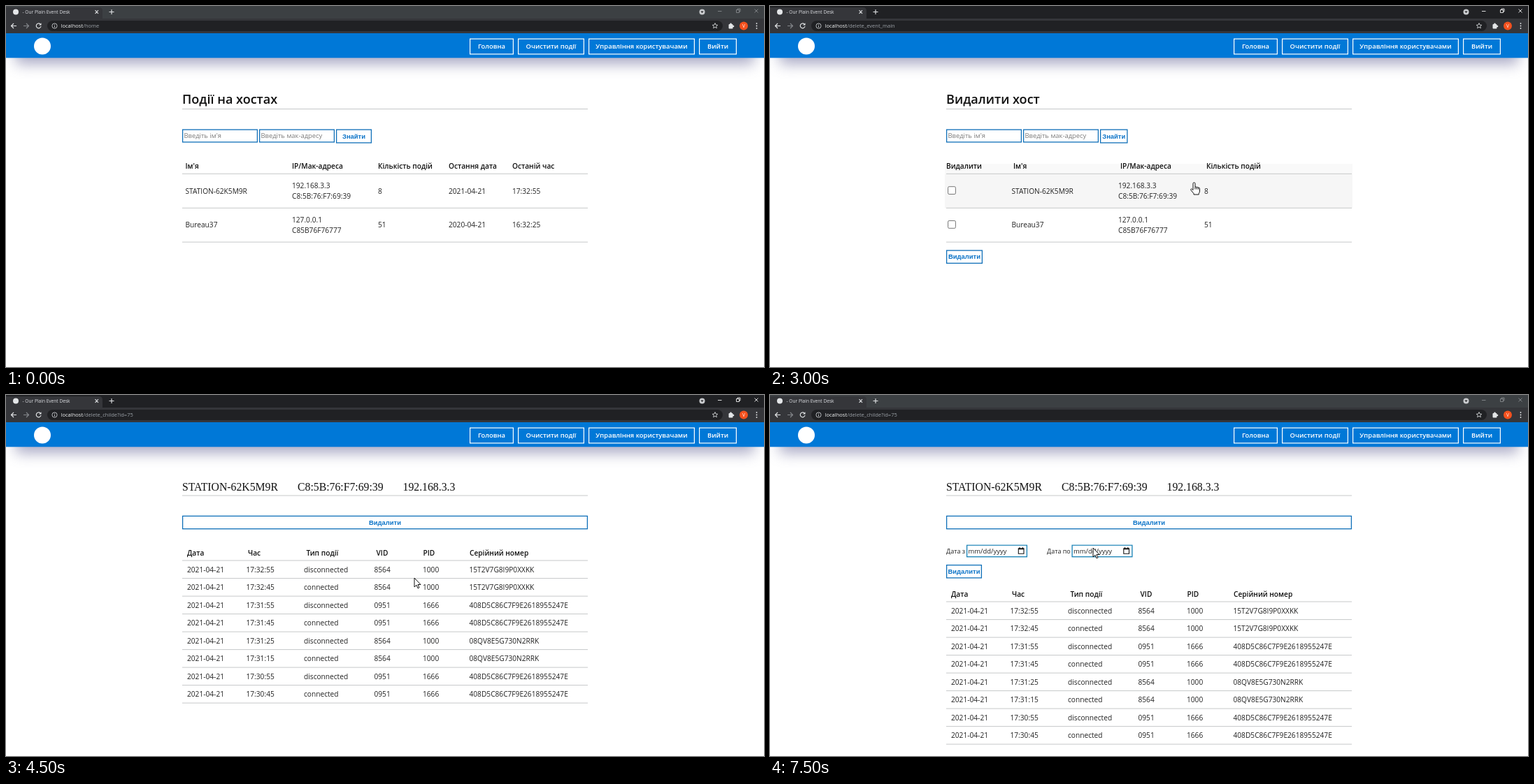
Write an HTML page that moves like this. It is 1084 px wide and 517 px high and loops after 8000 ms.

```html
<!DOCTYPE html>
<html lang="uk">
<head>
<meta charset="utf-8">
<style>
  html, body { margin: 0; width: 100%; height: 100%; overflow: hidden; background: #fff; }
  #stage { display: block; width: 1084px; height: 517px; }
  text { font-family: "Open Sans", sans-serif; white-space: pre; }
  .arial text, text.arial { font-family: "Liberation Sans", Arial, sans-serif; }
  text.serif { font-family: "Liberation Serif", serif; }
  .bold { font-weight: 700; }
  .semi { font-weight: 600; }
  .mid { text-anchor: middle; }
</style>
</head>
<body>
<svg id="stage" viewBox="0 0 1084 517"></svg>
<script>
const LOOP = 8000, STEP = 250;
const BODY = 10.16, CONTROL = 9.41, BLUE = '#0f6fb8', LINK = '#0c74c8';
const stage = document.getElementById('stage');

// y is the middle of the capital letters
const text = (x, y, str, size = BODY, cls = '', fill = '#222') =>
  `<text x="${x}" y="${y + size * .36}" font-size="${size}" class="${cls}" fill="${fill}">${str}</text>`;
const box = (x, y, w, h, fill, extra = '') =>
  `<rect x="${x}" y="${y}" width="${w}" height="${h}" fill="${fill}" ${extra}/>`;
const path = (d, stroke, width = 1, fill = 'none') =>
  `<path d="${d}" stroke="${stroke}" stroke-width="${width}" fill="${fill}"/>`;
const dot = (x, y, r, fill, extra = '') => `<circle cx="${x}" cy="${y}" r="${r}" fill="${fill}" ${extra}/>`;
const frame = (x1, y1, x2, y2, color, width = 1.3, radius = 0) =>
  box(x1 + .6, y1 + .6, x2 - x1 - 1.2, y2 - y1 - 1.2, 'none',
    `stroke="${color}" stroke-width="${width}" rx="${radius}"`);
const rule = y => path(`M252 ${y}H832`, '#c6c8c9', 1);
const button = (x1, y1, x2, y2, label, color = LINK, radius = 0) =>
  frame(x1, y1, x2, y2, color === LINK ? BLUE : color, 1.3, radius) +
  text((x1 + x2) / 2, (y1 + y2) / 2 - .2, label, CONTROL, 'arial bold mid', color);
const cells = (xs, y, values, cls = '', fill = '#222') =>
  values.map((v, i) => text(xs[i], y, v, BODY, cls, fill)).join('');

const HOSTS = [
  { name: 'STATION-62K5M9R', ip: '192.168.3.3', mac: 'C8:5B:76:F7:69:39', count: 8, seen: ['2021-04-21', '17:32:55'] },
  { name: 'Bureau37', ip: '127.0.0.1', mac: 'C85B76F76777', count: 51, seen: ['2020-04-21', '16:32:25'] }
];
const DEVICES = [
  ['8564', '1000', '15T2V7G8I9P0XXKK'],
  ['0951', '1666', '408D5C86C7F9E2618955247E'],
  ['8564', '1000', '08QV8E5G730N2RRK'],
  ['0951', '1666', '408D5C86C7F9E2618955247E']
];
const EVENTS = ['32:55', '32:45', '31:55', '31:45', '31:25', '31:15', '30:55', '30:45'].map((time, i) =>
  ['2021-04-21', '17:' + time, i % 2 ? 'connected' : 'disconnected', ...DEVICES[i >> 1]]);

// Pointer way points: time, x, y
const POINTER = [
  [250, 701, 380], [500, 730, 230], [750, 757, 120], [1000, 774, 62], [1250, 777, 56],
  [2250, 777, 56], [2500, 755, 120], [2750, 655, 228], [3000, 606.5, 253], [3750, 584.5, 267.5],
  [4500, 584, 262], [4750, 572, 205], [5000, 565.5, 182], [5500, 565.5, 182], [5750, 564, 185],
  [6250, 563, 186], [6750, 520, 204], [7250, 462, 219], [8000, 462, 219]
];

function pointerAt(t) {
  const i = POINTER.findIndex(p => p[0] > t);
  const [t0, x0, y0] = POINTER[i - 1], [t1, x1, y1] = POINTER[i];
  const k = (t - t0) / (t1 - t0);
  return [x0 + (x1 - x0) * k, y0 + (y1 - y0) * k];
}

function pointer(t) {
  if (t < 250) return '';
  const [x, y] = pointerAt(t);
  const hand = t >= 1000 && t < 2500 || t >= 3000 && t < 4500 || t >= 5000 && t < 6500;
  const shape = hand
    ? 'M-1.5 10V1.3a1.5 1.5 0 0 1 3 0V6.3q1.3-.8 2.4.3q1.4-.7 2.3.5q1.8-.3 1.8 1.6V12q0 2-1.3 3.5V17H-.5V15.6L-4.6 10.6q-.6-1.2.4-1.6q1-.3 2.7 1.6z' +
      'M1.5 6.3V9.5M3.9 6.6V9.5M6.2 7.1V9.7'
    : 'M0 0V13L3 10.2L5 14.8L7 13.9L5 9.5H9z';
  return `<g transform="translate(${x} ${y})">${path(shape, '#111', 1, '#fff')}</g>`;
}

function browser(t, url, focused, loading) {
  const glyph = focused ? '#f1f1f1' : '#85888c', icon = '#e4e6e8';
  const star = Array.from({ length: 10 }, (_, i) => {
    const a = i * Math.PI / 5, r = i % 2 ? 1.8 : 4;
    return `${(1014 + r * Math.sin(a)).toFixed(1)} ${(28.5 - r * Math.cos(a)).toFixed(1)}`;
  }).join('L');
  return box(0, 0, 1084, 39, focused ? '#202124' : '#3c4043') +
    path('M0 18V2H133Q138 2 138 7V18H1084V39H0z', 'none', 0, '#35363a') +
    (loading
      ? `<g transform="rotate(${t * .36 % 360} 14.5 8.5)">${path('M14.5 4.5a4 4 0 0 1 0 8', icon, 1.1)}</g>`
      : dot(14, 8.5, 4, icon)) +
    text(23.5, 8.3, '- Our Plain Event Desk', 6.6, '', '#dfe1e5') +
    path('M127.5 6.2L132 10.8M132 6.2L127.5 10.8M147.5 8.5H154.5M151 5V12', icon, 1.1) +
    dot(995.5, 8.5, 4, '#c8cacd') + path('M993.5 7.5H997.5L995.5 10z', 'none', 0, '#202124') +
    path('M1018 7.5H1023.5M1044.5 5.5H1048.5V9.5H1044.5zM1046 5.5V4H1050V8H1048.5M1070.5 4.5L1075.5 9.5M1075.5 4.5L1070.5 9.5', glyph, .9) +
    path('M15 28.5H7.5M11 25L7.5 28.5L11 32', icon, 1.2) +
    path('M25 28.5H32.5M29 25L32.5 28.5L29 32', '#85888c', 1.2) +
    (loading
      ? path('M43.5 25.2L50 31.8M50 25.2L43.5 31.8', icon, 1.3)
      : path('M50 29a3.4 3.4 0 1 1-1-3.1', icon, 1.2) + path('M50.5 24.3V27.5H47.2z', 'none', 0, icon)) +
    box(59, 21, 966, 15, '#202124', 'rx="7.5"') +
    dot(69.5, 28.5, 3.6, 'none', 'stroke="#c8cacd" stroke-width=".9"') +
    path('M69.5 28V30.6M69.5 26.3V27.2', '#c8cacd', .9) +
    text(78.5, 28.3, `localhost<tspan fill="#9aa0a6">/${url}</tspan>`, 7.55, '', '#f1f3f4') +
    path(`M${star}z`, icon, .8) +
    box(1033.5, 26, 6, 6.5, icon, 'rx="1"') + dot(1036.5, 25.7, 1.3, icon) + dot(1040, 29, 1.3, icon) +
    dot(1055, 28.5, 6, '#f4511e') + text(1055, 28.5, 'V', 6.5, 'mid', '#fff') +
    [25, 28.5, 32].map(y => dot(1073.5, y, .9, icon)).join('');
}

function header(plain, hover) {
  const labels = ['Головна', 'Очистити події', 'Управління користувачами', 'Вийти'];
  const edges = plain
    ? [[671, 733], [740, 832], [838, 986], [992, 1045]]
    : [[663, 726], [732, 827], [833, 985], [991, 1045]];
  return box(14, 44, 1056, 39, '#54548a', 'opacity=".5" style="filter:blur(10px)"') +
    box(0, 39, 1084, 35.3, '#0078d7') +
    (plain ? '' : dot(52, 57.5, 12, '#fff')) +
    labels.map((label, i) => {
      const [x1, x2] = edges[i], lit = hover && i === 1;
      return frame(x1, 46.5, x2, 69.5, lit ? '#cfd8f2' : '#fff', 1.2, lit ? 2.5 : 0) +
        text((x1 + x2) / 2, 57.8, label, CONTROL, 'mid ' + (plain ? 'arial bold' : 'semi'), lit ? '#b9bde6' : '#fff');
    }).join('');
}

const search = right =>
  frame(252, 176.5, 360, 195.5, BLUE) + text(254.5, 186, "Введіть ім'я", CONTROL, '', '#7b7b7b') +
  frame(362, 176.5, 470, 195.5, BLUE) + text(364.5, 186, 'Введіть мак-адресу', CONTROL, '', '#7b7b7b') +
  button(472, 176.5, right, 196.5, 'Знайти');

const title = str => text(252, 133, str, 18.06, 'semi', '#111') + rule(147.5);

function hostRows(nameX, ipX, countX, extra) {
  return HOSTS.map((h, i) => {
    const y = 265 + i * 48.8;
    return text(nameX, y, h.name) + text(ipX, y - 7.7, h.ip) + text(ipX, y + 7.5, h.mac) +
      text(countX, y, h.count) + extra(h, y) + rule(y + 24.3);
  }).join('');
}

const homePage = () => title('Події на хостах') + search(523) +
  cells([256.5, 409, 532, 633, 724], 229.5,
    ["Ім'я", 'IP/Мак-адреса', 'Кількість подій', 'Остання дата', 'Останій час'], 'semi', '#111') + rule(240.3) +
  hostRows(256.5, 409, 532, (h, y) => cells([633, 724], y, h.seen));

function hostsPage(t) {
  const headLit = t >= 2750 && t <= 3000 ? box(250, 226, 583, 14.5, '#f9f9f9') : '';
  const rowLit = t >= 3000 ? box(250, 240.5, 583, 49, '#f6f6f6') : '';
  return headLit + rowLit + title('Видалити хост') + search(511.5) +
    cells([252, 348, 501, 624], 229.5, ['Видалити', "Ім'я", 'IP/Мак-адреса', 'Кількість подій'], 'semi', '#111') +
    rule(240.3) +
    hostRows(345.5, 498, 621, (h, y) =>
      box(254.6, y - 6.3, 10.8, 10.8, '#fff', 'rx="1.6" stroke="#767676" stroke-width="1"')) +
    button(252, 349.5, 304, 369, 'Видалити');
}

const dateField = (x, label) =>
  text(x, 223.7, label, 9.03);
const dateInput = x =>
  frame(x, 214.5, x + 87, 232.3, '#1580b5') + text(x + 2.5, 223.5, 'mm/dd/yyyy', CONTROL) +
  path(`M${x + 74.3} 219.8H${x + 82}V227.3H${x + 74.3}zM${x + 74.3} 220.6H${x + 82}M${x + 76} 218V220M${x + 80.3} 218V220`, '#111', 1.1);

function eventsPage(t) {
  const plain = t < 4250;
  const k = Math.min(1, Math.max(0, (t - 5210) / 400));
  const open = 59 * (1 - Math.cos(Math.PI * k)) / 2;
  const shift = k > .15 ? open : 0;
  const hover = t >= 5000 && t < 6500;
  const color = !hover ? LINK : t >= 5250 && t < 5750 ? '#111' : '#123f78';
  const headX = [259, 346, 429.5, 529.5, 596.5, 663], dataX = [259, 343.5, 426, 526.5, 596, 662.5];
  const heads = ['Дата', 'Час', 'Тип події', 'VID', 'PID', 'Серійний номер'];
  const top = HOSTS[0];

  let out = text(252, 131.5, top.name, 15.75, 'serif', '#111') +
    text(417, 131.5, top.mac, 15.75, 'serif', '#111') +
    text(567.5, 131.5, top.ip, 15.75, 'serif', '#111') + rule(144) +
    button(252, 172.8, 832, 192.3, 'Видалити', color, hover ? 2.5 : 0);

  if (plain) {
    out += cells(headX, 225.5, heads.slice(0, 5), 'bold', '#111') +
      text(252, 241.2, heads[5], BODY, 'bold', '#111') + rule(252.8) +
      EVENTS.map((row, i) => {
        const y = 265.3 + i * 40.8;
        return cells(dataX, y, row.slice(0, 5)) + text(252, y + 15.4, row[5]) + rule(y + 28.3);
      }).join('');
    return `<g class="arial">${out}</g>`;
  }
  if (open > 0)
    out += `<svg x="0" y="214.3" width="1084" height="${open}" viewBox="0 214.3 1084 ${open}">` +
      dateField(252, 'Дата з') + dateInput(281) + dateField(396, 'Дата по') + dateInput(431.5) +
      button(252, 243, 303, 262.5, 'Видалити') + '</svg>';
  return out + `<g transform="translate(0 ${shift})">` +
    cells(headX, 226, heads, 'semi', '#111') + rule(237) +
    EVENTS.map((row, i) => cells(dataX, 250 + i * 25.5, row) + rule(262.6 + i * 25.5)).join('') + '</g>';
}

function draw(t) {
  const loading = t === 1500 || t >= 3500 && t < 4250;
  const focused = t >= 1500 && t < 7500;
  const url = t < 1500 ? 'home' : t < 3500 ? 'delete_event_main' : 'delete_childe?id=75';
  const page = t < 1750 ? homePage() : t < 4000 ? hostsPage(t) : eventsPage(t);
  stage.innerHTML = header(t >= 4000 && t < 4250, t >= 1000 && t < 2500) +
    browser(t, url, focused, loading) + page + pointer(t);
}

let shown = -1;
function tick() {
  const t = Math.floor(performance.now() % LOOP / STEP) * STEP;
  if (t !== shown) draw(shown = t);
  requestAnimationFrame(tick);
}
tick();
</script>
</body>
</html>
```
